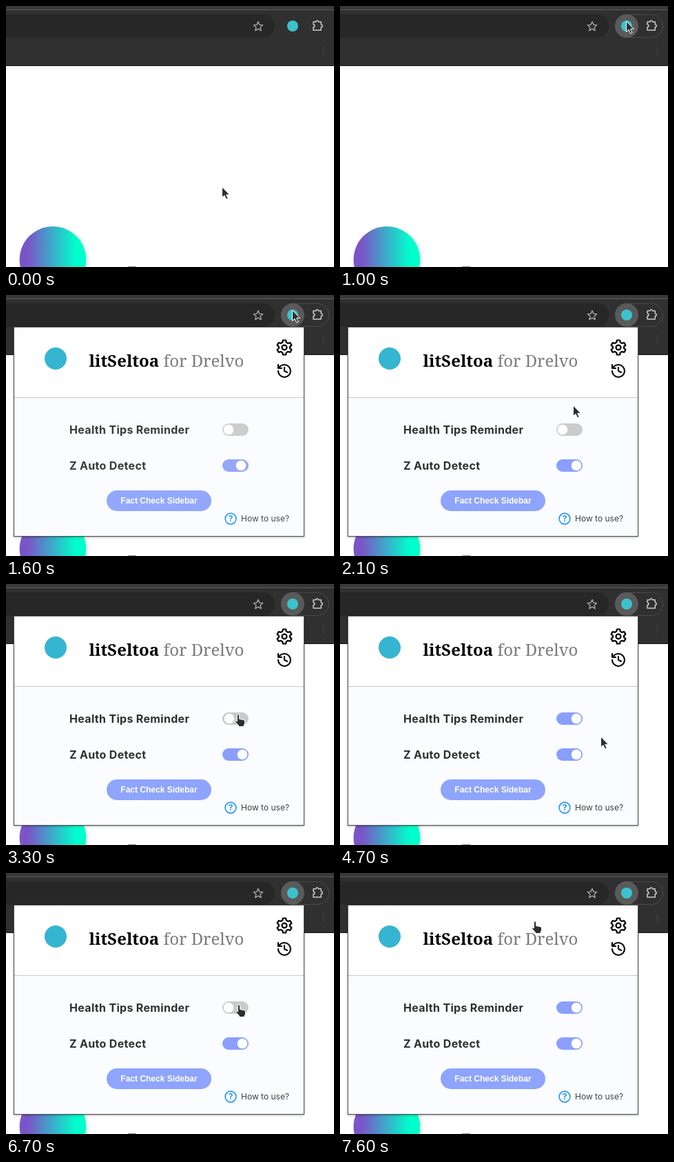
An HTML page that plays this animation: 476 by 378 pixels, repeating every 7.7 s.

```html
<!DOCTYPE html>
<html lang="en">
<head>
<meta charset="utf-8">
<title>Extension popup</title>
<style>
  @property --on { syntax: "<number>"; inherits: true; initial-value: 0; }
  @property --hand { syntax: "<number>"; inherits: true; initial-value: 0; }

  html, body { margin: 0; width: 100%; height: 100%; overflow: hidden; background: #fff; }
  svg { display: block; }
  .line { fill: none; stroke-linejoin: round; stroke-linecap: round; }

  .title { font: 24px "Noto Serif", serif; fill: #7b7b7b; }
  .title tspan { font-weight: 700; fill: #000; }
  .label { font: 700 16px Inter, sans-serif; letter-spacing: .02em; fill: #303030; }
  .button { font: 700 12px "Liberation Sans", Arial, sans-serif; fill: #fff; text-anchor: middle; }
  .help { font: 12px Inter, sans-serif; fill: #404040; }
  .mark { font: 700 12px Inter, sans-serif; fill: #2196f3; text-anchor: middle; }

  .hover, .popup, .body, .toggle, .cursor {
    animation: 7.7s step-end infinite;
  }
  .hover { animation-name: hover; }
  .popup { animation-name: open; }
  .body { animation-name: settle; }
  .tips { animation-name: tips; }
  .auto { animation-name: auto; }
  .cursor { animation-name: move, grab; }

  .track { fill: color-mix(in srgb, #8b9ffa calc(var(--on) * 100%), #cbcbcb); }
  .knob { fill: #fff; transform: translateX(calc(var(--on) * 20px)); }
  .arrow { opacity: calc(1 - var(--hand)); }
  .pointer { opacity: var(--hand); }
  .arrow, .pointer { fill: #2e2e2e; stroke: #fff; stroke-width: 1; stroke-linejoin: round; }

  @keyframes hover {
    0% { opacity: 0; }
    11.68%, 100% { opacity: 1; }
  }
  @keyframes open {
    0% { opacity: 0; transform: translateY(-2px); }
    18.18% { opacity: .35; transform: translateY(-2px); }
    19.48% { opacity: .7; transform: translateY(-1px); }
    20.77%, 100% { opacity: 1; transform: none; }
  }
  @keyframes settle {
    0% { opacity: .4; }
    19.48% { opacity: .7; }
    20.77% { opacity: .95; }
    22.07%, 100% { opacity: 1; }
  }
  @keyframes auto {
    0% { --on: 0; }
    19.48% { --on: .55; }
    20.77% { --on: .9; }
    22.07%, 100% { --on: 1; }
  }
  @keyframes tips {
    0% { --on: 0; }
    42.85% { --on: .05; animation-timing-function: steps(4); }
    48.05% { --on: 1; }
    71.42% { --on: .95; animation-timing-function: steps(4); }
    76.62% { --on: 0; }
    92.20% { --on: .05; animation-timing-function: steps(4); }
    97.40%, 100% { --on: 1; }
  }
  @keyframes grab {
    0% { --hand: 0; }
    29.87% { --hand: 1; }
    53.24% { --hand: 0; }
    63.63% { --hand: 1; }
    74.02% { --hand: 0; }
    85.71%, 100% { --hand: 1; }
  }
  @keyframes move {
    0% { transform: translate(313px, 262px); }
    2.59% { transform: translate(313px, 262px); animation-timing-function: steps(3); }
    6.49% { transform: translate(332px, 215px); animation-timing-function: steps(3); }
    10.38% { transform: translate(404px, 52px); animation-timing-function: steps(2); }
    12.98% { transform: translate(415px, 22px); }
    22.07% { transform: translate(415px, 22px); animation-timing-function: steps(2); }
    24.67% { transform: translate(386px, 62px); animation-timing-function: steps(2); }
    27.27% { transform: translate(338px, 160px); animation-timing-function: steps(4); }
    32.46% { transform: translate(337px, 189px); }
    51.94% { transform: translate(337px, 189px); animation-timing-function: steps(3); }
    55.84% { transform: translate(424px, 238px); }
    57.14% { transform: translate(424px, 238px); animation-timing-function: steps(3); }
    61.03% { transform: translate(378px, 221px); animation-timing-function: steps(4); }
    66.23% { transform: translate(332px, 185px); }
    72.72% { transform: translate(332px, 185px); animation-timing-function: steps(3); }
    76.62% { transform: translate(405px, 252px); }
    79.22% { transform: translate(405px, 252px); animation-timing-function: steps(6); }
    87.01% { transform: translate(338px, 191px); }
    94.80% { transform: translate(338px, 191px); animation-timing-function: steps(3); }
    98.70%, 100% { transform: translate(283px, 70px); }
  }
</style>
</head>
<body>
<svg width="476" height="378" viewBox="0 0 476 378">
  <defs>
    <linearGradient id="ball">
      <stop offset=".12" stop-color="#7a55c7"/>
      <stop offset=".85" stop-color="#00ffcc"/>
    </linearGradient>
    <filter id="soft" x="-20%" y="-20%" width="140%" height="140%">
      <feDropShadow dx="2" dy="2" stdDeviation="3" flood-opacity=".15"/>
    </filter>
    <filter id="lift" x="-5%" y="-5%" width="110%" height="110%">
      <feDropShadow dx="0" dy="1" stdDeviation="1.5" flood-opacity=".3"/>
    </filter>
    <g id="switch">
      <rect class="track" width="38" height="18" rx="9"/>
      <circle class="knob" cx="9" cy="9" r="7.3"/>
    </g>
  </defs>

  <!-- page -->
  <rect width="476" height="378" fill="#fff"/>
  <circle cx="68" cy="367.5" r="48.3" fill="url(#ball)" filter="url(#soft)"/>
  <rect x="177" y="377" width="12" height="1" fill="#888"/>

  <!-- browser bar -->
  <rect width="476" height="87" fill="#303030"/>
  <rect width="476" height="5" fill="#393939"/>
  <rect y="5" width="476" height="1" fill="#5c5c5c"/>
  <rect y="86" width="476" height="1" fill="#171217"/>
  <rect x="-40" y="12" width="430" height="34" rx="17" fill="#272727"/>
  <rect x="460" y="58" width="1" height="14" fill="#444"/>
  <g class="hover">
    <rect x="399.5" y="12.5" width="69" height="33" rx="16.5" fill="none" stroke="#4b4b4b"/>
    <circle cx="416" cy="29" r="17" fill="#5a5a5a"/>
  </g>
  <path class="line" transform="translate(357 20) scale(.75)" stroke="#a9a9a9" stroke-width="1.8"
    d="M12 3.5l2.6 6 6.4.6-4.9 4.3 1.5 6.4-5.6-3.4-5.6 3.4 1.5-6.4L3 10.1l6.4-.6z"/>
  <circle cx="416" cy="29" r="8" fill="#3bc2cc"/>
  <path class="line" transform="translate(443 18.5) scale(.75)" stroke="#cacaca" stroke-width="2"
    d="M4 6h5a2.5 2.5 0 0 1 5 0h5v5a2.5 2.5 0 0 1 0 5v6H4v-6a2.5 2.5 0 0 0 0-5z"/>

  <!-- popup -->
  <g class="popup">
    <rect x="11.5" y="46.5" width="421" height="303" fill="#fff" stroke="#4c4c4c" filter="url(#lift)"/>
    <rect x="12" y="149" width="420" height="200" fill="#fafcff"/>
    <rect x="12" y="148" width="420" height="1" fill="#c8c8c8"/>
    <circle cx="72" cy="92" r="16" fill="#35b5cf"/>
    <text class="title" x="120.5" y="104"><tspan>litSeltoa</tspan> for Drelvo</text>
    <g class="line" stroke="#000" stroke-width="2.1">
      <g transform="translate(391.4 63.4) scale(1.05)">
        <path d="M10 2h4l.7 3 2.3 1.3 2.9-.9 2 3.4-2.2 2.1v2.2l2.2 2.1-2 3.4-2.9-.9-2.3 1.3-.7 3h-4l-.7-3-2.3-1.3-2.9.9-2-3.4 2.2-2.1v-2.2l-2.2-2.1 2-3.4 2.9.9 2.3-1.3z"/>
        <circle cx="12" cy="12" r="3.3"/>
      </g>
      <path transform="translate(392 98)"
        d="M3 12a9 9 0 1 0 9-9 9.75 9.75 0 0 0-6.74 2.74L3 8M3 3v5h5M12 7v5l4 2"/>
    </g>
    <g class="body">
      <text class="label" x="92" y="201">Health Tips Reminder</text>
      <text class="label" x="92" y="253">Z Auto Detect</text>
      <g transform="translate(314 186)"><g class="toggle tips"><use href="#switch"/></g></g>
      <g transform="translate(314 238)"><g class="toggle auto"><use href="#switch"/></g></g>
      <rect x="146" y="283" width="152" height="30" rx="15" fill="#8ea4fd"/>
      <text class="button" x="222" y="302">Fact Check Sidebar</text>
      <circle class="line" cx="326" cy="324" r="7.9" stroke="#2196f3" stroke-width="1.6"/>
      <text class="mark" x="326" y="328.3">?</text>
      <text class="help" x="341" y="328">How to use?</text>
    </g>
  </g>

  <g class="cursor">
    <path class="arrow" d="M.5 0v15.5l3.5-3.2 2.6 5.7 2.6-1.1-2.5-5.6h4.8z"/>
    <path class="pointer" d="M-1.6 1.5a1.6 1.6 0 0 1 3.2 0v5l6 1.2q2 .5 2 2.3v3l-1.5 3v1.5H.5v-1.5l-4.6-5q-.8-1.5.8-2l1.7 1z"/>
  </g>
</svg>
</body>
</html>
```
